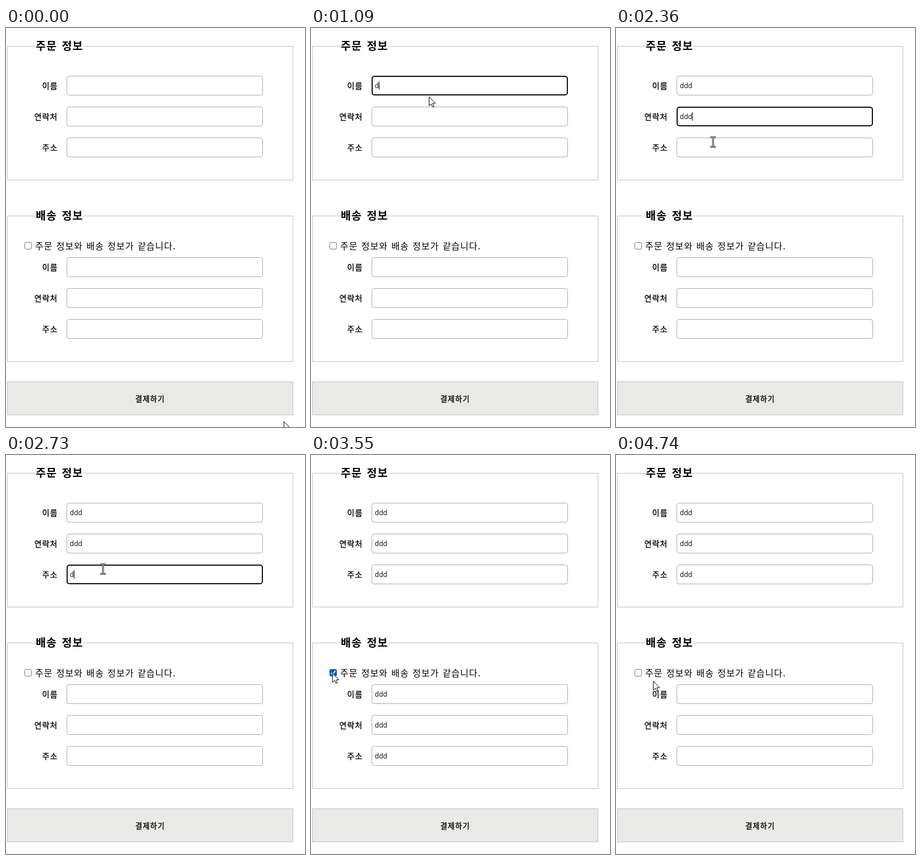
An HTML page for the animation above (4810 ms loop, 533 px wide and 710 px high).

```html
<!DOCTYPE html>
<html lang="ko">
<head>
<meta charset="utf-8">
<style>
html, body { margin: 0; width: 100%; height: 100%; overflow: hidden; background: #fff; }
svg { display: block; width: 533px; height: 710px; }
text { font-family: "Noto Sans CJK KR", "Noto Sans CJK", "Noto Sans CJK JP", sans-serif; letter-spacing: 1px; word-spacing: .055em; white-space: pre; }
.title { font-weight: 700; font-size: 19.5px; word-spacing: .115em; }
.medium { font-size: 14px; stroke: #000; stroke-width: .35px; }
.value { font-family: "Open Sans", "Noto Sans", sans-serif; font-size: 12px; letter-spacing: 0; }
</style>
</head>
<body>
<svg id="stage" viewBox="0 0 533 710" lang="ko"></svg>
<script>
const LOOP = 4810, STEP = 74;
const FIELD = { x: 108, w: 350, h: 35 };
const BOX = { x: 33, y: 381, size: 13 };
const stage = document.getElementById('stage');

function set(el, attrs) {
  for (const k in attrs) el.setAttribute(k, attrs[k]);
}
function add(tag, attrs, text = '') {
  const el = document.createElementNS('http://www.w3.org/2000/svg', tag);
  set(el, attrs);
  el.textContent = text;
  return stage.appendChild(el);
}
function show(el, on) {
  el.setAttribute('visibility', on ? 'visible' : 'hidden');
}
function frame(y, h, fill) {
  add('rect', { x: 2.5, y: y + .5, width: 509, height: h - 1, fill, stroke: '#c0c0c0' });
}
function panel(y, h, title) {
  frame(y, h, 'none');
  add('rect', { x: 53, y: y - 2, width: 84, height: 5, fill: '#fff' });
  add('text', { x: 53, y: y + 7, class: 'title' }, title);
}
function field(y, name) {
  add('text', { x: 92.3 - 13.9 * name.length, y: y + 23.3, class: 'medium' }, name);
  return {
    y,
    frame: add('rect', { fill: '#fff', rx: 4 }),
    value: add('text', { x: 113.8, y: y + 22, class: 'value' })
  };
}

panel(32, 239, '주문 정보');
panel(334, 260, '배송 정보');
const names = ['이름', '연락처', '주소'];
const fields = [85, 408].flatMap(top => names.map((name, i) => field(top + 55 * i, name)));

const box = add('rect', { x: BOX.x + .5, y: BOX.y + .5, width: BOX.size - 1, height: BOX.size - 1, rx: 2 });
const tick = add('path', { d: 'M35.8 387.8l2.5 2.6 5-6.2', fill: 'none', stroke: '#fff', 'stroke-width': 1.9 });
add('text', { x: 52, y: 393.5, 'font-size': 16 }, '주문 정보와 배송 정보가 같습니다.');

frame(629, 60, '#e9e9e7');
add('text', { x: 230.5, y: 664.6, class: 'medium', style: 'font-size: 13.33px' }, '결제하기');

const caret = add('rect', { width: 1 });
const halo = add('circle', { r: 12, fill: '#ff0', 'fill-opacity': .53 });
const arrow = add('path', { d: 'M.5.5V16.5L4.2 13 6.8 18.5 9.2 17.4 6.7 12H11.8Z', fill: '#fff', stroke: '#000' });
const beamPath = 'M-5-8.5H-1.5L0-7.5 1.5-8.5H5M0-7.5V7.5M-5 8.5H-1.5L0 7.5 1.5 8.5H5';
const beam = [['#222', 3], ['#fff', 1]].map(([stroke, width]) =>
  add('path', { d: beamPath, fill: 'none', stroke, 'stroke-width': width }));

// Pointer legs; it rests between them.
const legs = [
  { from: 0, to: 500, x: 214, y: 131 },
  { from: 790, to: 870, x: 222, y: 103 },
  { from: 1040, to: 1310, x: 192, y: 152 },
  { from: 1770, to: 1910, x: 173, y: 203 },
  { from: 2740, to: 3100, x: 44, y: 385 },
  { from: 3100, to: 3250, x: 38, y: 388 },
  { from: 4670, to: 4735, x: 66, y: 402 }
];
const visits = [{ focus: 870, type: 1090 }, { focus: 1770, type: 1990 }, { focus: 2660, type: 2700 }];
const presses = [650, 870, 1690, 2590, 3400, 4070];
const BLUR = 3400, CHECK = 3470, UNCHECK = 4220, KEY = 185;

const clamp = (v, max) => Math.min(max, Math.max(0, v));

function pointer(t) {
  const now = Math.floor((t + 20) / STEP) * STEP;
  let x = 495, y = 700;
  for (const leg of legs) {
    const u = clamp((now - leg.from) / (leg.to - leg.from), 1);
    const ease = Math.sin(u * Math.PI / 2);
    x += (leg.x - x) * ease;
    y += (leg.y - y) * ease;
  }
  return { x: Math.round(x), y: Math.round(y) };
}

function render(t) {
  const { x, y } = pointer(t);
  const checked = t >= CHECK && t < UNCHECK;
  const active = t < BLUR ? visits.filter(v => v.focus <= t).length - 1 : -1;
  const typed = visits.map(v => clamp(Math.floor((t - v.type) / KEY) + 1, 3));

  fields.forEach((f, i) => {
    const on = i === active;
    const line = on ? 2 : 1;
    set(f.frame, {
      x: FIELD.x + line / 2, y: f.y + line / 2,
      width: FIELD.w - line, height: FIELD.h - line,
      stroke: on ? '#101010' : '#a9a9a9', 'stroke-width': line
    });
    f.value.textContent = i < 3 || checked ? 'd'.repeat(typed[i % 3]) : '';
  });

  const atLabel = active < 0 && t >= presses[0] && t < BLUR;
  show(caret, atLabel || active >= 0);
  if (atLabel) set(caret, { x: 64, y: 93, height: 19 });
  else if (active >= 0) set(caret, { x: Math.round(114 + 7.4 * typed[active]), y: fields[active].y + 10, height: 15 });

  const inside = (left, top, w, h) => x >= left && x < left + w && y >= top && y < top + h;
  const hover = inside(BOX.x, BOX.y, BOX.size, BOX.size);
  const blue = hover ? '#005cc8' : '#0075ff';
  set(box, { fill: checked ? blue : '#fff', stroke: checked ? blue : hover ? '#4f4f4f' : '#767676' });
  show(tick, checked);

  const overField = fields.some(f => inside(FIELD.x, f.y, FIELD.w, FIELD.h));
  show(arrow, !overField);
  beam.forEach(b => show(b, overField));
  [arrow, ...beam].forEach(el => set(el, { transform: `translate(${x} ${y})` }));

  const hold = hover ? 150 : 75;
  set(halo, { cx: x - .5, cy: y - 1 });
  show(halo, presses.some(p => t >= p && t < p + hold));
}

const start = performance.now();
function loop() {
  render((performance.now() - start) % LOOP);
  requestAnimationFrame(loop);
}
loop();
</script>
</body>
</html>
```
